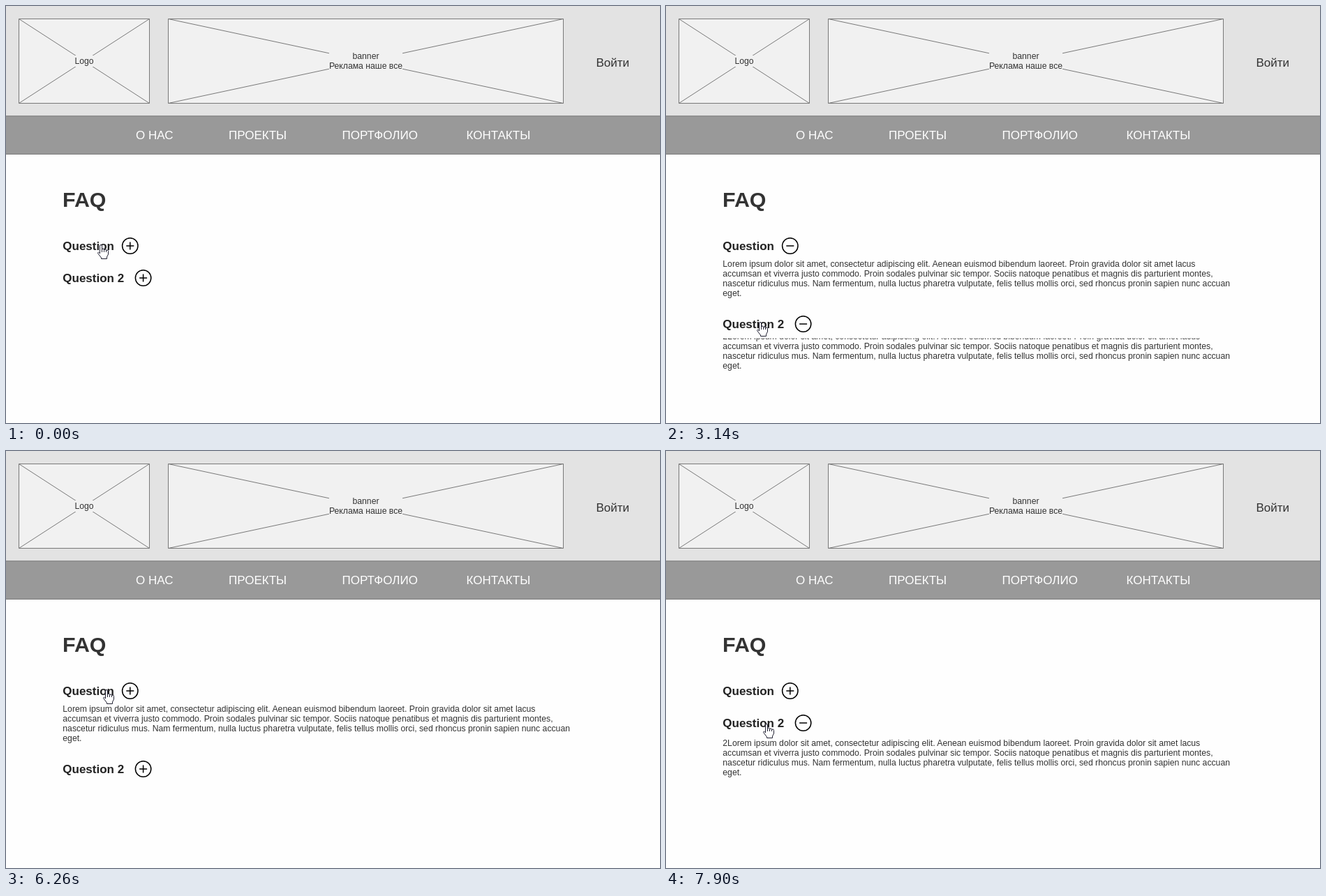
Animation of 937 by 598 pixels, one loop 8 s. Source, as an HTML page:

```html
<!DOCTYPE html>
<html lang="ru">
<head>
<meta charset="utf-8">
<title>FAQ</title>
<style>
  html, body { margin: 0; height: 100%; overflow: hidden; background: #fefefe; }
  svg { display: block; }
  text { font: 12.22px "Liberation Sans", Arial, sans-serif; fill: #333; white-space: pre; }
  .nav, .login { font-size: 17px; }
  .nav { fill: #fff; }
  .title { font-size: 30.4px; font-weight: bold; }
  .question { font-size: 17px; font-weight: bold; fill: #222; }
  .mid { text-anchor: middle; }
  .box { fill: #f1f1f1; stroke: #797979; }
  .gap { fill: #f1f1f1; }
  .icon { fill: none; stroke: #000; stroke-width: 1.5; }
  .cursor { fill: #fff; stroke: #223; stroke-linejoin: round; }
</style>
</head>
<body>
<svg id="stage" width="937" height="598">
  <rect width="937" height="158" fill="#e3e3e3"/>
  <rect x="-1" y="157.8" width="939" height="54.7" fill="#999" stroke="#797979"/>
  <text class="login" x="845.5" y="86.5">Войти</text>
  <text class="nav" x="186" y="190.5">О НАС</text>
  <text class="nav" x="319" y="190.5">ПРОЕКТЫ</text>
  <text class="nav" x="481.5" y="190.5">ПОРТФОЛИО</text>
  <text class="nav" x="659.5" y="190.5">КОНТАКТЫ</text>
  <text class="title" x="81" y="288">FAQ</text>
</svg>
<script>
const LOOP = 8000, SLIDE = 400, LINE = 14, FIRST_Y = 344, SECOND_Y = 390, PUSH = 66;
const lines = [
  'Lorem ipsum dolor sit amet, consectetur adipiscing elit. Aenean euismod bibendum laoreet. Proin gravida dolor sit amet lacus',
  'accumsan et viverra justo commodo. Proin sodales pulvinar sic tempor. Sociis natoque penatibus et magnis dis parturient montes,',
  'nascetur ridiculus mus. Nam fermentum, nulla luctus pharetra vulputate, felis tellus mollis orci, sed rhoncus pronin sapien nunc accuan',
  'eget.'
];
const pointerStart = { x: 136, y: 342 };
const pointerMoves = [
  { from: 880, to: 1500, x: 80, y: 455 },
  { from: 1500, to: 1980, x: 87, y: 440 },
  { from: 1980, to: 2300, x: 146, y: 459 },
  { from: 2300, to: 2520, x: 135, y: 453 },
  { from: 3400, to: 3780, x: 142, y: 461 },
  { from: 4940, to: 5190, x: 144, y: 342 },
  { from: 6680, to: 7020, x: 144, y: 391 }
];

const stage = document.getElementById('stage');
function add(parent, tag, attrs = {}, content = '') {
  const node = document.createElementNS('http://www.w3.org/2000/svg', tag);
  for (const key in attrs) node.setAttribute(key, attrs[key]);
  node.textContent = content;
  return parent.appendChild(node);
}

// Crossed-out frame with a caption over the middle
function placeholder(x, w, caption) {
  const y = 18.5, h = 121, cx = x + w / 2, cy = y + h / 2;
  add(stage, 'path', { class: 'box',
    d: `M${x} ${y}h${w}v${h}h${-w}zl${w} ${h}m${-w} 0l${w} ${-h}` });
  const gap = add(stage, 'rect', { class: 'gap' });
  const widths = caption.map((line, i) => add(stage, 'text',
    { class: 'mid', x: cx, y: cy + 4 + (i - (caption.length - 1) / 2) * LINE }, line)
    .getComputedTextLength());
  const gapW = Math.max(...widths), gapH = caption.length * LINE + 2;
  const box = { x: cx - gapW / 2, y: cy - gapH / 2, width: gapW, height: gapH };
  for (const key in box) gap.setAttribute(key, box[key]);
}
placeholder(18.5, 187, ['Logo']);
placeholder(232.5, 566, ['banner', 'Реклама наше все']);

function makeItem(title, iconX, clipY, height, prefix) {
  const root = add(stage, 'g');
  add(root, 'text', { class: 'question', x: 81.3, y: 6 }, title);
  add(root, 'circle', { class: 'icon', cx: iconX, r: 11.2 });
  const icon = add(root, 'path', { class: 'icon' });
  const clip = add(root, 'svg', { y: clipY, width: 937, overflow: 'hidden' });
  const answer = add(clip, 'g');
  lines.forEach((line, i) => add(answer, 'text',
    { x: 81.3, y: 12.5 + i * LINE }, (i ? '' : prefix) + line));
  return (y, open, amount) => {
    root.setAttribute('transform', `translate(0 ${y})`);
    icon.setAttribute('d', `M${iconX - 5.5} 0h11` + (open ? '' : `M${iconX} -5.5v11`));
    clip.setAttribute('height', height * amount);
    answer.setAttribute('transform', `translate(0 ${Math.round(height * (amount - 1))})`);
  };
}
const first = makeItem('Question', 177.8, 17.5, PUSH, '');
const second = makeItem('Question 2', 196.6, 20.5, 59, '2');

// Index finger followed by three folded ones, then the palm and thumb
const fingers = [2, 7.5, 8.5, 9.5].map(y => `V${y}a1.5 1.5 0 0 1 3 0V11`).join('');
const hand = add(stage, 'path', { class: 'cursor',
  d: `M-1.5 13${fingers}V14L8.5 18V20.5H.5V19L-4.5 12.5Q-4-10.5-1.5 13Z`.replace('-4-10.5', '-4 9.5') });
const arrow = add(stage, 'path', { class: 'cursor',
  d: 'M.5.5V16.5L4 13.2 6.5 19 9 18 6.5 12.3H11.5Z' });

const progress = (t, from, to) => Math.min(1, Math.max(0, (t - from) / (to - from)));
const smooth = p => p * p * (3 - 2 * p);
const slide = (t, start) => 1 - (1 - progress(t, start, start + SLIDE)) ** 2;

function pointer(t) {
  return pointerMoves.reduce((at, move) => {
    const p = smooth(progress(t, move.from, move.to));
    return { x: at.x + (move.x - at.x) * p, y: at.y + (move.y - at.y) * p };
  }, pointerStart);
}

function draw() {
  const t = performance.now() % LOOP;
  const amount1 = slide(t, 250) - slide(t, 6260);
  const amount2 = slide(t, 2910) - slide(t, 4620) + slide(t, 7510);
  const secondY = SECOND_Y + Math.round(PUSH * amount1);
  first(FIRST_Y, t >= 250 && t < 6260, amount1);
  second(secondY, t >= 2910 && t < 4620 || t >= 7510, amount2);

  const { x, y } = pointer(t);
  const over = x >= 82 && [FIRST_Y, secondY].some(center => Math.abs(y - center) <= 12);
  hand.style.display = over ? '' : 'none';
  arrow.style.display = over ? 'none' : '';
  for (const shape of [hand, arrow]) {
    shape.setAttribute('transform', `translate(${Math.round(x)} ${Math.round(y)})`);
  }
  requestAnimationFrame(draw);
}
draw();
</script>
</body>
</html>
```
